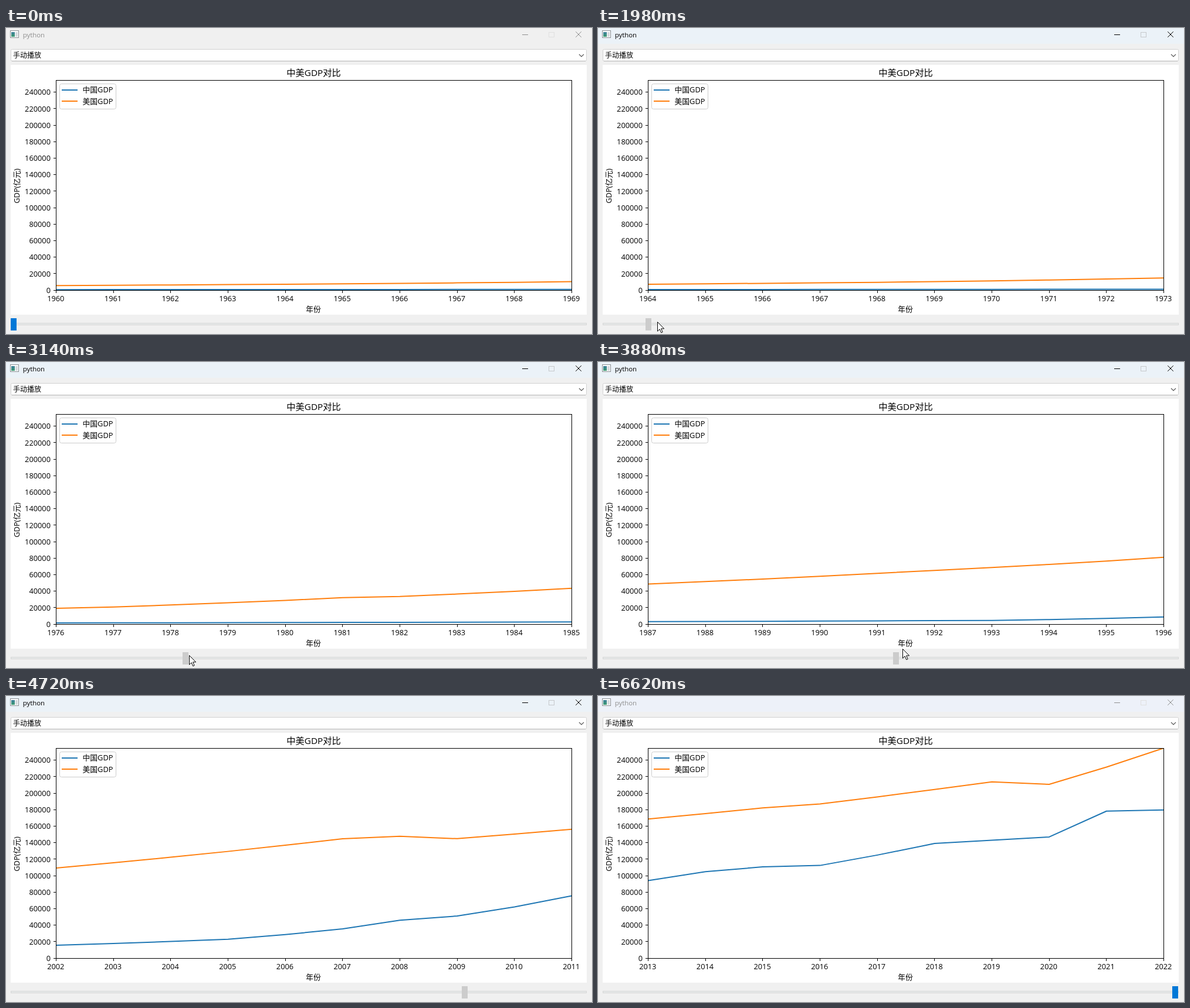
Animation, 999 px wide and 523 px high, one loop 6640 ms. Source, as an HTML page:

```html
<!DOCTYPE html>
<html lang="zh-CN">
<head>
<meta charset="utf-8">
<title>GDP</title>
<style>
html, body { margin: 0; width: 100%; height: 100%; overflow: hidden; background: #f0f0f0; }
svg { display: block; width: 999px; height: 523px; }
text { font-family: "Open Sans", "Noto Sans", "Noto Sans CJK SC", "Noto Sans CJK JP", sans-serif; font-size: 12.8px; }
.mid { text-anchor: middle; }
.end { text-anchor: end; }
</style>
</head>
<body>
<svg viewBox="0 0 999 523">
  <defs>
    <clipPath id="plotClip"><rect x="85.5" y="89.5" width="879" height="359"/></clipPath>
    <linearGradient id="pane" x2="0" y2="1"><stop stop-color="#3d7f9c"/><stop offset="1" stop-color="#3f9c72"/></linearGradient>
  </defs>
  <rect width="999" height="523" fill="#f0f0f0"/>
  <rect id="titleBar" width="999" height="27"/>

  <rect x="7.5" y="4.5" width="14" height="12" fill="#fff" stroke="#8a8f94"/>
  <rect x="9" y="7" width="6" height="8" fill="url(#pane)"/>
  <rect x="16" y="7" width="4" height="8" fill="#d5dade"/>
  <g id="chrome">
    <text x="28.7" y="16" style="font-size:11.4px">python</text>
    <path d="M880 11.5h10M971.2 6.2l9.6 9.6M980.8 6.2l-9.6 9.6" fill="none" stroke="currentColor"/>
  </g>
  <rect id="maximize" x="925.5" y="7.5" width="9" height="8" fill="none"/>

  <rect x="8.5" y="36.5" width="981" height="20" rx="2" fill="#fff" stroke="#d2d2d2"/>
  <path d="M10 56.5H988" stroke="#b4b4b4"/>
  <text x="12" y="51" style="font-size:12px">手动播放</text>
  <path d="M977 45l4 4 4-4" fill="none" stroke="#555" stroke-width="1.1"/>

  <rect x="8" y="63" width="982" height="427" fill="#fff"/>
  <text class="mid" x="524.5" y="82" style="font-size:15.3px">中美GDP对比</text>
  <text class="mid" x="524" y="485.2">年份</text>
  <text class="mid" transform="translate(23.3 270) rotate(-90)">GDP(亿元)</text>
  <g clip-path="url(#plotClip)" fill="none" stroke-width="2" stroke-linejoin="round">
    <path id="china" stroke="#1f77b4"/>
    <path id="usa" stroke="#ff7f0e"/>
  </g>
  <rect x="85.5" y="89.5" width="879" height="359" fill="none" stroke="#000"/>
  <g id="axes"></g>

  <rect x="91.5" y="95.5" width="96" height="43" rx="3" fill="#fff" fill-opacity=".8" stroke="#ccc"/>
  <path d="M95 106h27" stroke="#1f77b4" stroke-width="2"/>
  <path d="M95 125h27" stroke="#ff7f0e" stroke-width="2"/>
  <text x="130.5" y="110.3">中国GDP</text>
  <text x="130.5" y="130.3">美国GDP</text>

  <rect x="8.5" y="504.5" width="981" height="3" fill="#e7eaea" stroke="#d6d6d6"/>
  <rect id="handle" y="496" width="10" height="21"/>
  <path id="cursor" d="M.5 .5V16.3L4.1 12.8 6.8 18.8 9.2 17.7 6.6 11.9H11.7Z" fill="#fff" stroke="#000"/>
</svg>
<script>
const LOOP = 6640, REFRESH = 124, FIRST_YEAR = 1960, LAST_START = 2013, SPAN = 9;
const PLOT = { left: 85.5, bottom: 448, width: 879, height: 359, max: 254627 };
const ENTER = 270, HOVER = 510, PRESS = 670, RELEASE = 6230, LEAVE = 6350, BLUR = 6620;

// Turning points: [year, GDP]; growth is exponential in between
const USA = growth([
  [1960, 5433], [1968, 9425], [1977, 20818], [1981, 32070], [1982, 33438], [1985, 43390], [1987, 48552],
  [1991, 61581], [1995, 76397], [2000, 102510], [2002, 109291], [2007, 144742], [2008, 147699], [2009, 144781],
  [2015, 182060], [2016, 186951], [2019, 213726], [2020, 210605], [2022, 254627]]);
const CHINA = growth([
  [1960, 597], [1970, 926], [1980, 1911], [1993, 4447], [1996, 8637], [2000, 12113], [2005, 22860],
  [2007, 35503], [2008, 45943], [2009, 51017], [2011, 75515], [2014, 104757], [2015, 110616],
  [2016, 112333], [2018, 138948], [2020, 146877], [2021, 178205], [2022, 179632]]);

// The drag: [time, first year shown, pointer x, pointer y]
const DRAG = [
  [270, 1960, 54, 513], [492, 1960, 15, 507], [864, 1960, 14, 507], [1236, 1960, 19, 508],
  [1484, 1962, 44, 502], [1980, 1964.4, 101, 502], [2228, 1966, 140, 503], [3096, 1975.7, 312, 501],
  [3840, 1987, 519, 490], [4460, 1997, 703, 512], [4708, 2001.6, 793, 530],
  [5204, 2009, 919, 520], [5700, 2013, 981, 513], [5824, 2013, 984, 511]];

// Linear interpolation between rows of [position, ...values]
function along(keys, at) {
  const next = keys.findIndex(key => key[0] >= at);
  if (next === 0) return keys[0].slice(1);
  if (next < 0) return keys[keys.length - 1].slice(1);
  const a = keys[next - 1], b = keys[next];
  const k = (at - a[0]) / (b[0] - a[0]);
  return a.slice(1).map((v, i) => v + (b[i + 1] - v) * k);
}

function growth(keys) {
  const logs = keys.map(([year, value]) => [year, Math.log(value)]);
  return year => Math.exp(along(logs, year)[0]);
}

const $ = id => document.getElementById(id);
const set = (node, attrs) => { for (const k in attrs) node.setAttribute(k, attrs[k]); };
function add(tag, attrs, content = "") {
  const node = document.createElementNS("http://www.w3.org/2000/svg", tag);
  set(node, attrs);
  node.textContent = content;
  return $("axes").appendChild(node);
}
const plotX = i => PLOT.left + i * PLOT.width / SPAN;
const plotY = v => PLOT.bottom - v * PLOT.height / PLOT.max;

for (let v = 0; v <= 240000; v += 20000) {
  add("path", { d: `M81 ${Math.floor(plotY(v)) + .5}h4.5`, stroke: "#000" });
  add("text", { x: 76, y: plotY(v) + 4.7, class: "end" }, v);
}
const yearLabels = Array.from({ length: SPAN + 1 }, (_, i) => {
  add("path", { d: `M${Math.floor(plotX(i)) + .5} 448.5v4.5`, stroke: "#000" });
  return add("text", { x: plotX(i) - .7, y: 467.3, class: "mid" });
});

function curve(gdp, start) {
  return "M" + yearLabels.map((_, i) => `${plotX(i).toFixed(2)} ${plotY(gdp(start + i)).toFixed(2)}`).join("L");
}

function handleColor(time) {
  if (time < HOVER || time >= LEAVE) return "#0078d7";
  return time >= PRESS && time < RELEASE ? "#ccc" : "#171717";
}

function render(time) {
  const active = time >= PRESS && time < BLUR;
  const ink = active ? "#000" : "#8f8f8f";
  set($("titleBar"), { fill: active ? "#ebf2f8" : time < PRESS ? "#f0f0f0" : "#edf1f9" });
  set($("chrome"), { fill: ink, color: ink });
  set($("maximize"), { stroke: active ? "#c6c9cc" : "#e0e0e0" });

  // The screen refreshes at a steady pace, so motion advances in steps
  const [year, x, y] = along(DRAG, Math.floor(time / REFRESH) * REFRESH + 1980 % REFRESH - (time % REFRESH < 1980 % REFRESH ? REFRESH : 0));
  const start = Math.round(year);
  set($("china"), { d: curve(CHINA, start) });
  set($("usa"), { d: curve(USA, start) });
  yearLabels.forEach((label, i) => { label.textContent = start + i; });

  const progress = (start - FIRST_YEAR) / (LAST_START - FIRST_YEAR);
  set($("handle"), { x: 8 + Math.round(971 * progress), fill: handleColor(time) });
  set($("cursor"), {
    visibility: time >= ENTER && time < LEAVE ? "visible" : "hidden",
    transform: `translate(${Math.round(x)} ${Math.round(y)})`
  });
}

function tick() {
  render(performance.now() % LOOP);
  requestAnimationFrame(tick);
}
tick();
</script>
</body>
</html>
```
